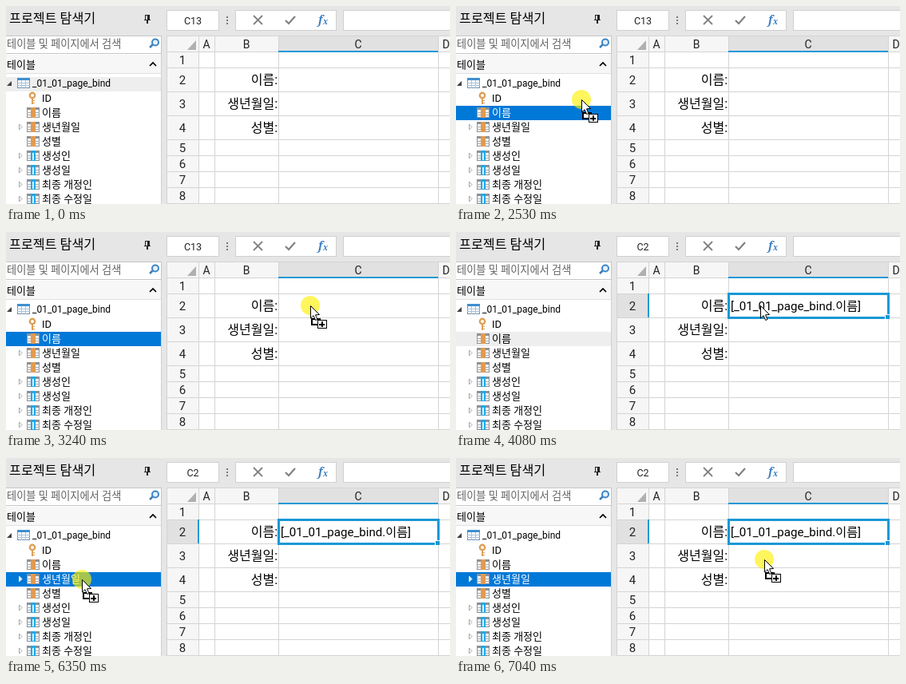
These frames come from a looping animation (556x248 px, 8000 ms). An HTML page with a canvas:

```html
<!DOCTYPE html>
<html lang="ko">
<head>
<meta charset="utf-8">
<style>
  html, body { margin: 0; width: 100%; height: 100%; overflow: hidden; background: #fff; }
  canvas { display: block; }
</style>
</head>
<body>
<canvas id="stage" width="556" height="248"></canvas>
<script>
const ctx = document.getElementById('stage').getContext('2d');
const LOOP = 8000, TICK = 76.7;
const BLUE = '#0078d7', ACCENT = '#1a98d5', LINE = '#d4d4d4', CHROME = '#e6e6e6', IDLE = '#eeeeee';
const SANS = 'Roboto, "Noto Sans CJK KR", "Noto Sans CJK", sans-serif';

// Moments of the story, in ms
const SELECT_NAME = 1600, DRAG_NAME = 2460, RELEASE = 3850, DROP_END = 3930,
      FILLED = 4080, SELECT_BIRTH = 5270, DRAG_BIRTH = 6350;

// Pointer moves: start time, number of ticks, key points [tick, x, y]
const moves = [
  { start: 990, ticks: 7, keys: [[1, 78, 241], [3, 75, 192], [5, 68, 147], [7, 64, 133]] },
  { start: DRAG_NAME, ticks: 11, keys: [[0, 64, 133], [1, 98, 122], [3, 215, 112], [6, 346, 101], [9, 376, 94], [11, 381, 92]] },
  { start: 4480, ticks: 5, keys: [[0, 381, 92], [1, 345, 98], [3, 148, 138], [4, 78, 158], [5, 53, 164]] },
  { start: 4950, ticks: 3, keys: [[0, 53, 164], [3, 61, 153]] },
  { start: DRAG_BIRTH, ticks: 10, keys: [[0, 61, 153], [1, 95, 152], [4, 245, 139], [7, 355, 130], [10, 386, 127]] }
];

const ORANGE = '#e39a4e', CYAN = '#22a7e8';
const fields = [
  { label: 'ID', key: true },
  { label: '이름', color: ORANGE },
  { label: '생년월일', color: ORANGE, expands: true },
  { label: '성별', color: ORANGE },
  { label: '생성인', color: CYAN, expands: true },
  { label: '생성일', color: CYAN, expands: true },
  { label: '최종 개정인', color: CYAN, expands: true },
  { label: '최종 수정일', color: CYAN, expands: true }
];
const columns = [['A', 241, 261], ['B', 261, 341], ['C', 341, 541], ['D', 541, 561]];
const rowTops = [57, 77, 107, 137, 167, 187, 207, 227, 247];

function rect(x, y, w, h, color) {
  ctx.fillStyle = color;
  ctx.fillRect(x, y, w, h);
}

function frame(x, y, w, h, border, fill) {
  rect(x, y, w, h, border);
  rect(x + 1, y + 1, w - 2, h - 2, fill);
}

function text(str, x, y, size, color = '#000', align = 'left', font = SANS, style = '') {
  ctx.font = `${style} ${size}px ${font}`;
  ctx.textAlign = align;
  ctx.fillStyle = color;
  ctx.fillText(str, x, y);
}

function paint({ fill, stroke, width = 1 }) {
  if (fill) { ctx.fillStyle = fill; ctx.fill(); }
  if (stroke) { ctx.strokeStyle = stroke; ctx.lineWidth = width; ctx.stroke(); }
}

function path(points, style) {
  ctx.beginPath();
  points.forEach(([x, y]) => ctx.lineTo(x, y));
  if (style.close) ctx.closePath();
  paint(style);
}

function circle(x, y, r, style) {
  ctx.beginPath();
  ctx.arc(x, y, r, 0, Math.PI * 2);
  paint(style);
}

function tableIcon(x, y) {
  frame(x, y, 16, 13, '#6d91b0', '#fff');
  rect(x, y, 16, 3, '#3f8fcf');
  for (const dx of [5, 10]) rect(x + dx, y + 3, 1, 10, '#a9c3d8');
  for (const dy of [6, 9]) rect(x, y + dy, 16, 1, '#a9c3d8');
}

function fieldIcon(x, y, color) {
  frame(x, y, 16, 13, '#8b9299', '#f4f5f6');
  rect(x, y, 16, 3, '#8b9299');
  for (const dy of [6, 9]) rect(x, y + dy, 16, 1, '#a9afb5');
  rect(x + 5, y, 6, 13, color);
  if (color === CYAN) rect(x + 7, y + 3, 2, 9, '#d9f1fc');
}

function keyIcon(x, y) {
  circle(x, y - 3, 3.2, { stroke: '#dda057', width: 2.4 });
  rect(x - 1, y, 2, 8, '#dda057');
  rect(x + 1, y + 3, 2, 1, '#dda057');
  rect(x + 1, y + 6, 2, 1, '#dda057');
}

function drawPanel(t) {
  rect(0, 0, 195, 37, CHROME);
  rect(0, 37, 194, 211, '#fff');
  rect(194, 37, 1, 211, '#d0d0d0');
  text('프로젝트 탐색기', 4, 21, 16.2);
  rect(174, 11, 6, 6, '#222');
  rect(175, 12, 2, 5, CHROME);
  rect(173, 17, 8, 1, '#222');
  rect(176, 18, 2, 4, '#222');

  frame(-1, 37, 196, 23, '#c6c6c6', '#fff');
  text('테이블 및 페이지에서 검색', 1, 52, 13.2, '#626262');
  path([[184, 48], [180, 52]], { stroke: '#3f7fbd', width: 2.5 });
  circle(187, 45.5, 4, { fill: '#e4f1fc', stroke: '#3f85c6', width: 2 });

  rect(0, 61, 194, 23, '#f7f7f7');
  rect(0, 84, 194, 1, '#e0e0e0');
  text('테이블', 1, 78, 13);
  path([[180, 75], [184, 71], [188, 75]], { stroke: '#000', width: 1.7 });

  if (t < SELECT_NAME) rect(0, 89, 194, 18, IDLE);
  path([[7, 94], [7, 100], [1, 100]], { fill: '#404040' });
  tableIcon(14, 90);
  text('_01_01_page_bind', 33, 101, 12);

  const selected = t < SELECT_NAME ? -1 : t < SELECT_BIRTH ? 1 : 2;
  const focused = t < FILLED || t >= SELECT_BIRTH;
  fields.forEach((field, i) => {
    const y = 115 + i * 18;
    const active = i === selected && focused;
    if (i === selected) rect(0, y - 8, 194, 18, focused ? BLUE : IDLE);
    if (field.key) keyIcon(33, y);
    else fieldIcon(26, y - 6, field.color);
    if (field.expands) {
      path([[16.5, y - 3], [20, y + .5], [16.5, y + 4]],
        { fill: '#fff', stroke: active ? '#d8ebfa' : '#a6a6a6', close: true });
    }
    text(field.label, 45, y + 5, 13, active ? '#fff' : '#000');
  });
}

function drawToolbar(filled) {
  rect(0, 0, 556, 248, CHROME);
  frame(201, 5, 66, 26, '#d0d0d0', '#fff');
  frame(287, 5, 127, 26, '#d0d0d0', '#fff');
  frame(422, 5, 140, 26, '#d0d0d0', '#fff');
  text(filled ? 'C2' : 'C13', 234, 23, 12.5, '#222', 'center');
  for (const y of [13, 17, 21]) rect(276, y, 2, 2, '#777');
  path([[310, 12], [321, 23]], { stroke: '#808080', width: 1.8 });
  path([[321, 12], [310, 23]], { stroke: '#808080', width: 1.8 });
  path([[350, 18], [354, 22], [362, 13]], { stroke: '#808080', width: 2.2 });
  text('f', 391, 22, 14, '#3b7fc4', 'left', '"Noto Serif", serif', 'italic bold');
  text('x', 397, 23, 10, '#3b7fc4', 'left', '"Noto Serif", serif', 'italic bold');
}

function drawSheet(filled) {
  rect(201, 38, 355, 210, '#fff');
  rect(201, 38, 355, 19, '#f6f6f6');
  rect(201, 57, 40, 191, '#f6f6f6');
  rect(341, 38, 200, 19, '#e1e1e1');
  if (filled) rect(201, 77, 40, 30, '#e1e1e1');
  path([[238, 43], [238, 55], [227, 55]], { fill: '#b0b0b0' });

  rect(201, 37, 355, 1, LINE);
  rect(201, 37, 1, 211, LINE);
  for (const y of rowTops) rect(201, y, 355, 1, LINE);
  for (const [name, left, right] of columns) {
    rect(left, 38, 1, 210, LINE);
    text(name, (left + right) / 2, 53, 14, '#222', 'center');
  }
  for (let i = 0; i < 8; i++) {
    text(i + 1, 221, (rowTops[i] + rowTops[i + 1]) / 2 + 6, 15, '#222', 'center');
  }
  rect(341, 56, 200, 2, ACCENT);

  ['이름:', '생년월일:', '성별:'].forEach((label, i) => text(label, 340, 98 + i * 30, 16, '#000', 'right'));

  if (filled) {
    rect(240, 77, 2, 30, ACCENT);
    ctx.strokeStyle = ACCENT;
    ctx.lineWidth = 3;
    ctx.strokeRect(341.5, 77.5, 200, 30);
    rect(537, 103, 6, 6, '#fff');
    rect(538, 104, 5, 5, ACCENT);
    text('[_01_01_page_bind.이름]', 344, 98, 15.1);
  }
}

function pointerAt(t) {
  const move = moves.filter(m => t >= m.start).pop();
  if (!move) return null;
  const tick = Math.min(move.ticks, 1 + Math.floor((t - move.start + 8) / TICK));
  const keys = move.keys;
  const next = Math.max(1, keys.findIndex(k => k[0] >= tick));
  const [k0, x0, y0] = keys[next - 1], [k1, x1, y1] = keys[next];
  const p = (tick - k0) / (k1 - k0);
  return [Math.round(x0 + (x1 - x0) * p), Math.round(y0 + (y1 - y0) * p)];
}

function drawPointer(t) {
  const position = pointerAt(t);
  if (!position) return;
  const pressed = (t >= SELECT_NAME && t < RELEASE) || t >= SELECT_BIRTH;
  const dragging = (t >= DRAG_NAME && t < DROP_END) || t >= DRAG_BIRTH;
  ctx.save();
  ctx.translate(...position);
  if (pressed) circle(0, 0, 12, { fill: 'rgba(255,240,0,.64)' });
  if (dragging) {
    rect(1, 16, 12, 9, '#000');
    rect(3, 18, 8, 5, '#fff');
  }
  path([[.5, .5], [.5, 16], [4, 12.7], [6.7, 18.5], [9, 17.5], [6.5, 11.8], [11.5, 11.5]],
    { fill: '#fff', stroke: '#000', close: true });
  if (dragging) {
    frame(9, 18, 12, 11, '#000', '#fff');
    rect(11, 23, 7, 2, '#000');
    rect(14, 20, 2, 7, '#000');
  }
  ctx.restore();
}

function draw(t) {
  const filled = t >= FILLED;
  drawToolbar(filled);
  drawPanel(t);
  drawSheet(filled);
  drawPointer(t);
}

const begin = performance.now();
function loop() {
  draw((performance.now() - begin) % LOOP);
  requestAnimationFrame(loop);
}
loop();
</script>
</body>
</html>
```
